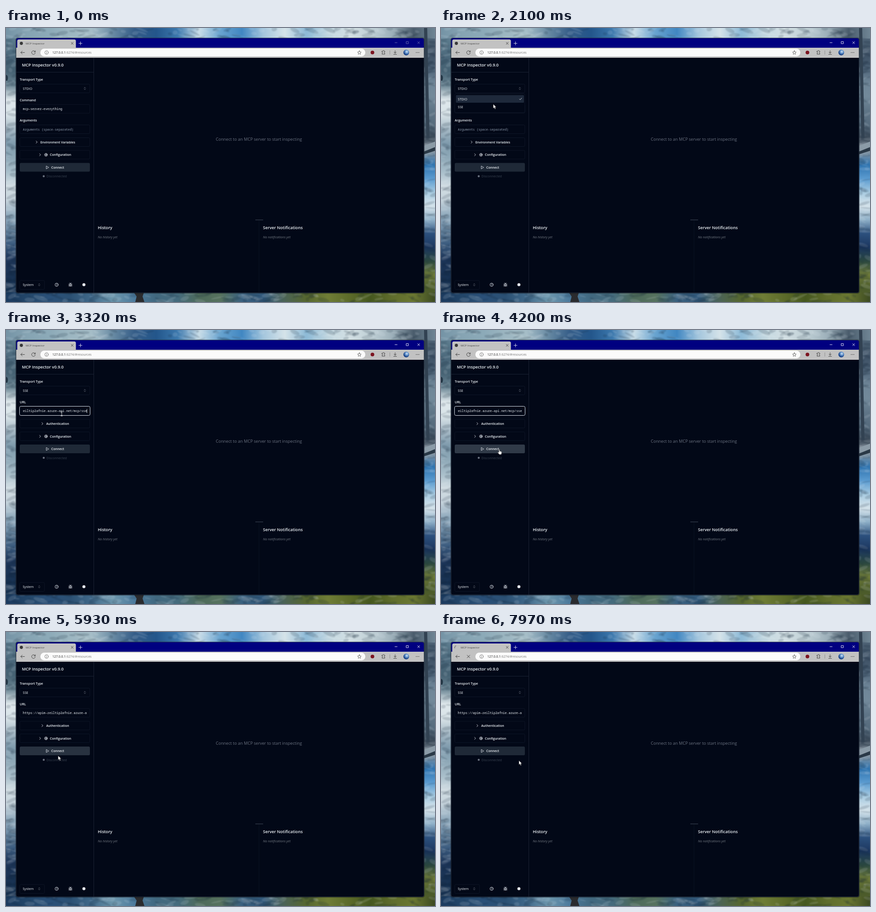
An HTML page with a canvas that plays this animation: 936 by 598 pixels, repeating every 8000 ms.

```html
<!DOCTYPE html>
<html lang="en">
<head>
<meta charset="utf-8">
<title>MCP Inspector</title>
<style>
html, body { margin: 0; width: 100%; height: 100%; overflow: hidden; background: #1b3a5e; }
canvas, svg { position: absolute; left: 0; top: 0; width: 936px; height: 598px; }
text { font: 7.05px "Open Sans", "Noto Sans", sans-serif; fill: #f1f5f9; white-space: pre; }
.b { font-weight: 600; }
.h { font-size: 9.07px; font-weight: 600; }
.m { font: 500 6.83px "Noto Sans Mono", "DejaVu Sans Mono", monospace; }
.i { font-style: italic; fill: #737982; }
.dim { fill: #6b7280; }
.box { fill: none; stroke: #121b2c; stroke-width: .8; }
.ring { fill: none; stroke: #d6dbe3; stroke-width: 1; }
.line { fill: none; stroke: #e5e9f0; stroke-width: .85; stroke-linecap: round; stroke-linejoin: round; }
.ink { stroke: #303030; }

/* 80 ms = 1% */
.t { animation: 8s step-end infinite; }
.blur { animation-name: blur; }
.focus { animation-name: focus; }
.stdio { animation-name: stdio; }
.sse { animation-name: sse; }
.pop { animation-name: pop; }
.hl { animation-name: hl; }
.lower { animation-name: lower; }
.ring1 { animation-name: ring1; }
.ring2 { animation-name: ring2; }
.ring3 { animation-name: ring3; }
.first { animation-name: first; }
.tail { animation-name: tail; }
.head { animation-name: head; }
.caret { animation-name: caret; }
.idle { animation-name: idle; }
.load { animation-name: load; }
.arrow { animation-name: arrow; }
.beam { animation-name: beam; }
.hand { animation-name: hand; }
.click { animation-name: click; }
.btn { animation: hover 8s linear infinite; }
.cur { animation: move 8s linear infinite; }
.spin { animation: spin 1s linear infinite; transform-origin: 33px 33.5px; }

@keyframes blur { 0% { opacity: 1 } 14.25%, 100% { opacity: 0 } }
@keyframes focus { 0% { opacity: 0 } 14.25%, 100% { opacity: 1 } }
@keyframes stdio { 0% { opacity: 1 } 30.25%, 100% { opacity: 0 } }
@keyframes sse { 0% { opacity: 0 } 30.25%, 100% { opacity: 1 } }
@keyframes pop { 0%, 30.25%, 100% { opacity: 0 } 23.6% { opacity: 1 } }
@keyframes hl { 0% { transform: none } 28%, 100% { transform: translateY(17.5px) } }
@keyframes lower { 0% { transform: none } 30.25%, 100% { transform: translateY(-44.6px) } }
@keyframes ring1 { 0%, 23.6%, 100% { opacity: 0 } 14.25% { opacity: 1 } }
@keyframes ring2 { 0%, 36.4%, 100% { opacity: 0 } 30.25% { opacity: 1 } }
@keyframes ring3 { 0%, 56.1%, 100% { opacity: 0 } 36.4% { opacity: 1 } }
@keyframes first { 0%, 39.75%, 100% { opacity: 0 } 30.25% { opacity: 1 } }
@keyframes tail { 0%, 56.1%, 100% { opacity: 0 } 39.75% { opacity: 1 } }
@keyframes head { 0% { opacity: 0 } 56.1%, 100% { opacity: 1 } }
@keyframes caret { 0%, 44.6%, 100% { opacity: 0 } 39.75% { opacity: 1 } }
@keyframes idle { 0% { opacity: 1 } 89.1%, 100% { opacity: 0 } }
@keyframes load { 0% { opacity: 0 } 89.1%, 100% { opacity: 1 } }
@keyframes arrow {
  0%, 9.75%, 30.25%, 51.25%, 87.4% { opacity: 0 }
  2.62%, 17.5%, 48.2%, 73.2%, 90%, 100% { opacity: 1 }
}
@keyframes beam { 0%, 17.5%, 48.2%, 100% { opacity: 0 } 9.75%, 30.25% { opacity: 1 } }
@keyframes hand { 0%, 73.2%, 90%, 100% { opacity: 0 } 51.25%, 87.4% { opacity: 1 } }
@keyframes click {
  0%, 15.2%, 24.4%, 30.9%, 37.4%, 57.4%, 100% { opacity: 0 }
  13.35%, 22.9%, 29.5%, 36.3%, 56.1% { opacity: 1 }
}
@keyframes hover {
  0%, 51.2%, 75.2%, 87.2%, 91%, 100% { fill: #1f2937 }
  52.3%, 73.2%, 88.2%, 89.6% { fill: #303a48 }
}
@keyframes move {
  0%, 2.62% { transform: translate(860px, 575px) }
  4.5% { transform: translate(610px, 440px) }
  7.1% { transform: translate(240px, 255px) }
  9.75% { transform: translate(50px, 176px) }
  11.75%, 16% { transform: translate(89px, 181.5px) }
  22.8%, 23.8% { transform: translate(112px, 133px) }
  26.2% { transform: translate(114px, 166px) }
  28%, 30.2% { transform: translate(114px, 172px) }
  33%, 39.75% { transform: translate(120.5px, 172.5px) }
  41.4%, 47.3% { transform: translate(121.5px, 183px) }
  52.4% { transform: translate(127px, 260px) }
  54.2%, 72.3% { transform: translate(128.5px, 263.5px) }
  74%, 86.4% { transform: translate(113.7px, 270px) }
  88.2%, 89.1% { transform: translate(118px, 264.5px) }
  96.1%, 97.3% { transform: translate(165px, 277px) }
  99.5%, 100% { transform: translate(170px, 280.5px) }
}
@keyframes spin { to { transform: rotate(360deg) } }
</style>
</head>
<body>
<canvas id="sky" width="936" height="598"></canvas>
<svg viewBox="0 0 936 598">
  <defs>
    <clipPath id="win"><rect x="22" y="22" width="890" height="556" rx="4"/></clipPath>
    <clipPath id="field"><rect x="36" y="168" width="141" height="18"/></clipPath>
    <radialGradient id="face" cx=".6" cy=".35" r=".7">
      <stop offset="0" stop-color="#dfe9f5"/><stop offset=".35" stop-color="#6f9fd4"/><stop offset=".8" stop-color="#163f86"/>
    </radialGradient>
    <path id="next" class="line" d="M-1.4-2.4 1.2 0-1.4 2.4"/>
    <path id="updown" class="line" d="M-1.5-1 0-2.5 1.5-1M-1.5 1 0 2.5 1.5 1" stroke-opacity=".55"/>
    <rect id="row" class="box" x="30" width="153" height="19" rx="2.5"/>
  </defs>

  <rect x="20.5" y="21" width="893" height="559" rx="5" fill="#000" opacity=".3"/>
  <g clip-path="url(#win)">
    <path fill="#020817" d="M22 22h890v556H22z"/>
    <path fill="#000080" d="M22 22h890v22H22z"/>
    <path fill="#c2c2c2" d="M22 43h890v22H22z"/>
    <path fill="#c2c2c2" d="M24.500 44V28.500q0-3.500 3.500-3.500h121q3.500 0 3.500 3.500V44z"/>
  </g>
  <rect x="22" y="22" width="890" height="556" rx="4" fill="none" stroke="#303a4c" stroke-width=".7"/>

  <!-- tab strip -->
  <circle class="t idle" cx="33.500" cy="33.500" r="3.400" fill="#383838"/>
  <g class="t load"><path class="line ink spin" d="M29.800 34.300A3.300 3.300 0 0 1 33 30.200"/></g>
  <text x="43" y="35.800" style="font-size:6.06px;fill:#444">MCP Inspector</text>
  <path class="line ink" d="M142.300 31.300l4.400 4.400m0-4.400-4.400 4.400"/>
  <path class="line" d="M159 33.500h7m-3.500-3.500v7"/>
  <g class="t blur" opacity="0"><g class="line" style="stroke:#7474b4"><path d="M848.500 32h5M873.500 29.700h4.500v4.500h-4.500zM898 29.700l4.600 4.600m0-4.600-4.600 4.600"/></g></g>
  <g class="t focus"><path class="line" style="stroke:#fff" d="M848.500 32h5M873.500 29.700h4.500v4.500h-4.500zM898 29.700l4.600 4.600m0-4.600-4.600 4.600"/></g>

  <!-- toolbar -->
  <rect x="75" y="45" width="709" height="17" rx="8.500" fill="#fbfbfb"/>
  <g class="line ink">
    <path d="M40.500 53.500h-8.300m3.300-3.300-3.300 3.300 3.300 3.300"/>
    <path class="t idle" d="M63.700 52a4 4 0 1 0 .2 2.600M63.900 49.500V52.300H61"/>
    <path class="t load" d="M57 50.500l6 6m0-6-6 6"/>
    <g stroke="#666"><circle cx="88.500" cy="53.500" r="3.800"/><path d="M88.500 53.300v2M88.500 51.500v.1"/></g>
    <path stroke="#555" d="M771 49.500l1.200 2.700 2.900.3-2.200 2 .6 2.900-2.500-1.500-2.500 1.500.6-2.900-2.200-2 2.900-.3z"/>
    <path d="M820.500 50.500h2a1.300 1.300 0 0 1 2.600 0h1.400v2a1.300 1.300 0 0 0 0 2.600v2h-6v-2a1.300 1.300 0 0 0 0-2.600z"/>
    <path stroke="#888" d="M837.500 49.500v8"/>
    <path d="M849 49.500v5.500m-2.600-2.500 2.600 2.600 2.600-2.600M845.800 57.500h6.400"/>
  </g>
  <circle cx="799.500" cy="53.500" r="4" fill="#7c1420"/>
  <circle cx="873.300" cy="53.500" r="6.200" fill="url(#face)"/>
  <path d="M895 53.500h.1m2.800 0h.1m2.800 0h.1" class="line ink" style="stroke-width:1.400"/>
  <text x="101" y="56" style="font-size:6.95px;fill:#777"><tspan fill="#222">127.0.0.1</tspan>:6274/#resources</text>

  <!-- page frame -->
  <path d="M191.500 65v513M22 96.500h169.500" stroke="#1e2637" stroke-width=".9" fill="none"/>
  <path d="M552 420v158" stroke="#0c1526" stroke-width=".9"/>
  <path d="M544 418.800h17" stroke="#343d4c" stroke-width="1.300"/>
  <text class="h" x="34.700" y="84.300">MCP Inspector v0.9.0</text>
  <text class="dim" x="457.700" y="245.700" style="font-size:9.09px">Connect to an MCP server to start inspecting</text>
  <text class="h" x="200.300" y="438.700">History</text>
  <text class="h" x="560.800" y="438.700">Server Notifications</text>
  <text class="i" x="200.300" y="459.300">No history yet</text>
  <text class="i" x="560.800" y="459.300">No notifications yet</text>

  <!-- sidebar -->
  <text class="b" x="30" y="115">Transport Type</text>
  <use href="#row" y="122.500"/>
  <use href="#updown" x="172" y="132"/>
  <text class="t stdio" x="36.800" y="134.700">STDIO</text>
  <text class="t sse" x="36.800" y="134.700">SSE</text>
  <rect class="ring t ring2" x="29.500" y="121.800" width="154" height="20.500" rx="3"/>

  <use href="#row" y="167"/>
  <g class="t stdio">
    <text class="b" x="30" y="159.700">Command</text>
    <text class="m" x="36.800" y="179">mcp-server-everything</text>
    <text class="b" x="30" y="204.400">Arguments</text>
    <use href="#row" y="211.500"/>
    <text class="m" x="36.800" y="223.600" style="fill:#8b98aa;font-weight:400">Arguments (space-separated)</text>
    <use href="#next" x="67" y="249"/>
    <text class="b" x="75" y="251.700" style="font-size:6.950px">Environment Variables</text>
  </g>
  <rect class="ring t ring1" x="29.500" y="166.500" width="154" height="20" rx="3"/>
  <g class="t sse">
    <text class="b" x="30" y="159.700">URL</text>
    <use href="#next" x="79.500" y="204.400"/>
    <text class="b" x="87.700" y="207.100" style="font-size:6.950px">Authentication</text>
  </g>
  <g clip-path="url(#field)">
    <text class="m t first" x="36.800" y="179">http://localhost:3001/sse</text>
    <text class="m t tail" x="176.500" y="179" text-anchor="end">https://apim-zeiltip2afnie.azure-api.net/mcp/sse</text>
    <text class="m t head" x="36.800" y="179">https://apim-zeiltip2afnie.azure-a</text>
    <path class="t caret" d="M176.500 172.500v8.500" stroke="#fff" stroke-width=".8"/>
  </g>
  <rect class="ring t ring3" x="29.500" y="166.500" width="154" height="20" rx="3"/>

  <g class="t lower">
    <use href="#row" y="239.500"/>
    <use href="#row" y="267"/>
    <use href="#next" x="74.500" y="276.700"/>
    <g class="line" transform="translate(87.300 276.700)">
      <circle r="2.700"/><circle r="1"/>
      <path d="M0-3.700v1M0 2.700v1M-3.700 0h1M2.700 0h1M-2.600-2.600l.7.7M1.900 1.900l.7.7M-2.600 2.600l.7-.7M1.900-1.900l.7-.7"/>
    </g>
    <text class="b" x="95.700" y="279.400">Configuration</text>
    <rect class="btn" x="30" y="294.500" width="153" height="19" rx="2.500" fill="#1f2937"/>
    <path class="line" d="M88.200 301.300l5 3-5 3z"/>
    <text class="b" x="98.700" y="307">Connect</text>
    <circle cx="82.300" cy="323.500" r="2.200" fill="#6b7280"/>
    <text x="88.300" y="326.200" style="fill:#394250">Disconnected</text>
  </g>

  <g class="t pop">
    <rect x="30" y="143.500" width="153" height="41" rx="2.500" fill="#020817" stroke="#121b2c" stroke-width=".8"/>
    <rect class="t hl" x="32.500" y="146.500" width="148.500" height="16.500" rx="1.500" fill="#1e293b"/>
    <text x="36.800" y="157.500">STDIO</text>
    <text x="36.800" y="175">SSE</text>
    <path class="line" d="M171 155l1.700 1.700 3.300-3.700"/>
  </g>

  <!-- footer -->
  <rect class="box" x="30" y="551" width="54" height="19.500" rx="2.500"/>
  <text x="36.500" y="563.300">System</text>
  <use href="#updown" x="72.500" y="560.500"/>
  <g class="line">
    <circle cx="110.500" cy="560.300" r="3.600"/>
    <path d="M109.400 559.300a1.100 1.100 0 1 1 1.700 1q-.6.300-.6.800M110.500 562.300v.1"/>
    <rect x="138.600" y="558.500" width="3.800" height="5" rx="1.800"/>
    <path d="M140.500 560v3.500M139.200 558.300a1.300 1.300 0 0 1 2.600 0M138.600 559.700l-1.700-1.200M142.400 559.700l1.700-1.200M138.600 561.200h-2.100M142.400 561.200h2.100M138.800 562.600l-1.700 1.300M142.200 562.600l1.700 1.300M139.200 556.900l-.7-.7M141.800 556.900l.7-.7"/>
  </g>
  <circle cx="170" cy="560.300" r="3.300" fill="#e5e9f0"/>

  <!-- pointer -->
  <g class="cur">
    <circle class="t click" r="6.300" fill="#d2c02a" opacity="0"/>
    <path class="t arrow" d="M0 0v9.300l2.200-2 1.500 3.400 1.600-.7-1.500-3.300h2.900z" fill="#fff" stroke="#111" stroke-width=".5"/>
    <path class="t beam" d="M-2-4.700h1.300L0-4.300.7-4.700H2M0-4.300v8.600M-2 4.700h1.300L0 4.300l.7.400H2" fill="none" stroke="#fff" stroke-width=".9"/>
    <path class="t hand" d="M-.9.800Q0-.7.900.8v3.600q1.100-.7 1.600.3 1-.5 1.400.4 1.200-.4 1.300.8v2.600q0 2.800-1.800 3.100H.5Q-.6 10.900-3 7.700q-.6-1.400.6-1.600l1.500 1.100z" fill="#fff" stroke="#111" stroke-width=".5"/>
  </g>
</svg>
<script>
const ctx = document.getElementById('sky').getContext('2d');
let seed = 7;
const rnd = () => (seed = seed * 16807 % 2147483647) / 2147483647;

// One painted edge: evenly spaced tones, then loose brush strokes over them.
function edge(x, y, w, h, tones) {
  const wide = w > h;
  const g = ctx.createLinearGradient(x, y, wide ? x + w : x, wide ? y : y + h);
  const cols = tones.split(' ');
  cols.forEach((c, i) => g.addColorStop(i / (cols.length - 1), '#' + c));
  ctx.save();
  ctx.beginPath();
  ctx.rect(x, y, w, h);
  ctx.clip();
  ctx.fillStyle = g;
  ctx.fillRect(x, y, w, h);
  ctx.filter = 'blur(1.2px)';
  for (let i = 0; i < 110; i++) {
    ctx.fillStyle = rnd() < .5 ? 'rgba(235,243,248,.13)' : 'rgba(10,28,48,.16)';
    ctx.beginPath();
    ctx.ellipse(x + rnd() * w, y + rnd() * h, 3 + rnd() * 14, 1 + rnd() * 4, rnd() - .5, 0, 7);
    ctx.fill();
  }
  ctx.restore();
}
edge(0, 0, 24, 598, '6d8c9e 587789 4b687b 456172 708a98 dfe8ec d8e3e8 a7bac6 7f9bad 8fa9b8 a9bfcb d3dee4 c3d1da 90aabd 6d8ba5 3a5a7d 1d3558 1a3354 16304f 16304f');
edge(910, 0, 26, 598, '5f7587 4a5e71 3f5266 506579 6f8698 72899a 5f7587 566b7d 3c4a59 8796a2 2f74b0 5b9bd0 a9cce2 d4e2ea 8fb0c8 2c507d 1c3760 29463f 6d7a3a 4a5a2a 55622f');
edge(0, 0, 936, 23, '7493a5 86a4b3 8caab8 9cb6c1 a5bdc7 688aa3 355d88 23568b 3c78ad c9dde8 68a3cf 4187c2 a4c6dd d5e3e9 8dbad7 bfd5df d3e0e4 c0d0d6 9db0ba 4a5c6c 6f8594');
edge(0, 577, 936, 21, '1b3a5e 234669 2a5078 2b5073 40698a 6d97ad 4c7a9c 41687f 456b7d 4d6a5a 56725e 39607f 31587a 4b6355 56672f 6f7d36 5c6b2a 46581f 5f6d2c 6b7832 3c4a22');

const poly = (fill, pts) => { ctx.fillStyle = fill; ctx.fill(new Path2D(pts)); };
poly('#2a2b2e', 'M279 577h22l-3 9 4 12h-20l3-12z');
poly('#203342', 'M0 102q6 2 3 13H0z');
poly('#324252', 'M912 0h7l5 240h-7z');
poly('#8b9ba7', 'M911 257l25-9v12l-25 10z');
poly('#2a3947', 'M911 270l25-10v8l-25 8z');
</script>
</body>
</html>
```
